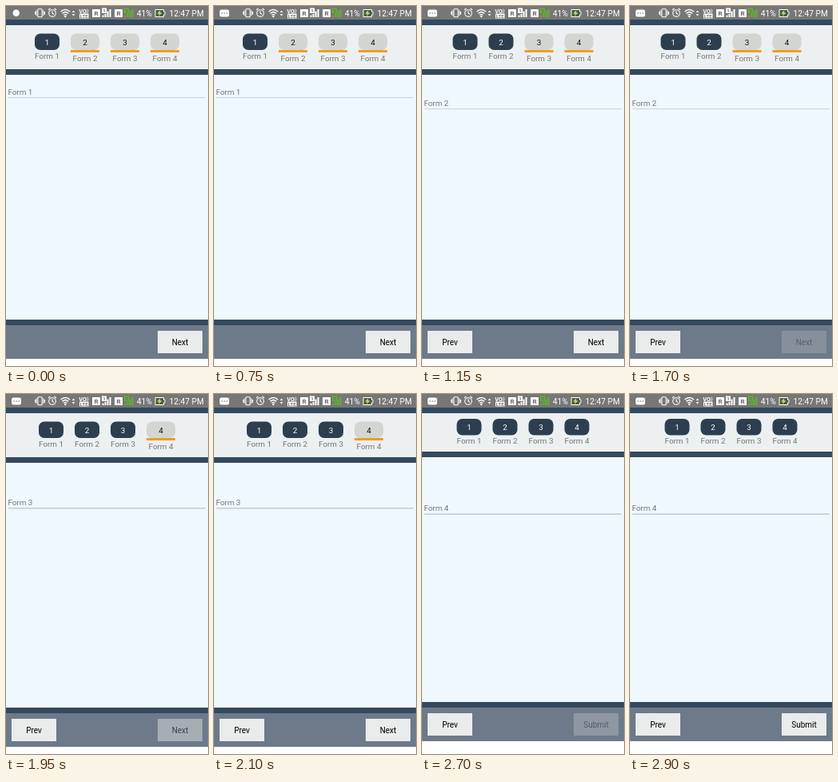
These frames come from a looping animation (253x450 px, 2.95 s). An HTML page:

```html
<!DOCTYPE html>
<html lang="en">
<head>
<meta charset="utf-8">
<title>Form steps</title>
<style>
  html, body { margin: 0; width: 100%; height: 100%; overflow: hidden; background: #fff; }
  svg { display: block; width: 100vw; height: 100vh; }
  text { font: 9.84px Roboto, sans-serif; }
  .mid { text-anchor: middle; }
  .label { fill: #727679; }
  .button text { font-size: 10px; }
  .clock { font-size: 10.2px; fill: #fff; }
  .tiny { font-size: 6px; font-weight: 700; }
</style>
</head>
<body>
<svg viewBox="0 0 253 450" preserveAspectRatio="none">
  <rect width="253" height="450" fill="#fff"/>
  <rect width="253" height="17.2" fill="#777"/>

  <g id="status" fill="#fff">
    <circle id="debug" cx="12.7" cy="8.7" r="4.2"/>
    <g id="chat">
      <rect x="7" y="4.5" width="12" height="9" rx="2.5"/>
      <g fill="#777">
        <circle cx="10" cy="9" r=".8"/><circle cx="13" cy="9" r=".8"/><circle cx="16" cy="9" r=".8"/>
      </g>
    </g>
    <g fill="none" stroke="#fff" stroke-width="1.1">
      <rect x="39.8" y="3.8" width="5.4" height="10" rx="1"/>
      <path d="M38 5.5v6.5M36.6 7v3.5M47 5.5v6.5M48.4 7v3.5"/>
      <circle cx="58" cy="9" r="4.3"/>
      <path d="M58 6.3V9l2 1.5M53 5l2.5-2.2M63 5l-2.5-2.2"/>
      <path d="M68.5 7q5.800-5 11.600 0M70.300 9.200q4-3.500 8 0M72.200 11.300q2.100-1.800 4.200 0" stroke-width="1.300"/>
    </g>
    <circle cx="74.300" cy="13" r="1.200"/>
    <path d="M82.700 8l1.800-2.600L86.300 8zM82.700 10l1.800 2.600 1.800-2.600z"/>
    <text class="tiny mid" x="96" y="8.500" style="font-size:7px">VO</text>
    <path d="M100.500 4.500q2 1.800 0 4M102 3.500q2.500 2.500 0 5.500" fill="none" stroke="#fff" stroke-width=".7"/>
    <rect x="92" y="9.500" width="11.500" height="6"/>
    <text class="tiny mid" x="97.700" y="14.600" fill="#777">LTE</text>
  </g>
  <g id="signals"></g>
  <text class="clock" x="163.700" y="12.600">41%</text>
  <path d="M187 4.500h10.500v2.500h1.500v4h-1.500v2.500H187z" fill="#4c6046" stroke="#fff"/>
  <path d="M193.500 4.800l-4 4.700h2.700l-1.500 3.700 4.500-5h-2.800z" fill="#d8f06a"/>
  <text class="clock" x="204.600" y="12.600">12:47 PM</text>

  <rect y="17" width="253" height="7" fill="#34495e"/>
  <rect y="24" width="253" height="55" fill="#ecf0f1"/>
  <g id="steps"></g>

  <g id="page">
    <rect y="79" width="253" height="362" fill="#34495e"/>
    <rect y="86" width="253" height="306" fill="#f0f8ff"/>
    <rect y="399" width="253" height="42" fill="#6d7a89"/>
    <g id="field">
      <text id="name" class="label" x="2.400" y="110.500"></text>
      <rect id="line" x="3" y="114" width="247" height="1"/>
    </g>
    <g id="prev" class="button">
      <rect x="7" y="406" width="56" height="28" fill="#eaebeb"/>
      <text class="mid" x="35" y="423.600">Prev</text>
    </g>
    <g id="next" class="button">
      <rect x="190" y="406" width="56" height="28" fill="#eaebeb"/>
      <text id="action" class="mid" x="218" y="423.600"></text>
    </g>
  </g>
</svg>
<script>
const LOOP = 2950, TICK = 50, FADE = 250, DIM = 0.2;
const taps = [{ down: 800, up: 900 }, { down: 1700, up: 1850 }, { down: 2550, up: 2650 }];
const lineColors = ['#c6d0d6', '#c8d1d8', '#adb6bc', '#a4b1bd'];
const $ = id => document.getElementById(id);

function add(parent, tag, attrs, text = '') {
  const node = document.createElementNS('http://www.w3.org/2000/svg', tag);
  for (const key in attrs) node.setAttribute(key, attrs[key]);
  node.textContent = text;
  parent.append(node);
  return node;
}

function addSignal(x, sim, color) {
  const g = $('signals');
  add(g, 'rect', { x: x - 12, y: 4, width: 10, height: 10, fill: '#fff' });
  add(g, 'text', { x: x - 7, y: 12, class: 'mid', fill: '#666', style: 'font-size:8px;font-weight:700' }, 'R');
  add(g, 'rect', { x, y: 2.5, width: 6, height: 6.5, fill: color });
  add(g, 'text', { x: x + 3, y: 8, class: 'tiny mid', fill: '#666' }, sim);
  for (let i = 0; i < 4; i++) {
    const h = i < 2 ? 2.5 + i * 1.5 : 2.5 + i * 2.5;
    add(g, 'rect', { x: x + 0.5 + i * 3, y: 14 - h, width: 2, height: h, fill: color });
  }
}
addSignal(120, '1', '#fff');
addSignal(148, '2', '#62b32a');

const steps = [1, 2, 3, 4].map(n => {
  const g = add($('steps'), 'g', {});
  return {
    g,
    pill: add(g, 'rect', { y: 34.5, height: 20.5, rx: 7 }),
    bar: add(g, 'rect', { y: 55, width: 36, height: 3, fill: '#f39c1f' }),
    digit: add(g, 'text', { y: 48.5, class: 'mid' }, n),
    label: add(g, 'text', { class: 'mid label' }, 'Form ' + n)
  };
});

function layoutSteps(form) {
  const widths = steps.map((_, i) => i < form ? 31 : 36);
  let x = (253 - widths.reduce((a, b) => a + b) - 14 * 3) / 2;
  steps.forEach((s, i) => {
    const active = i < form, w = widths[i];
    s.g.setAttribute('transform', `translate(${x} ${form === 4 ? -3.5 : 0})`);
    s.pill.setAttribute('width', w);
    s.pill.setAttribute('fill', active ? '#2c3e50' : '#d1d6d3');
    s.bar.setAttribute('visibility', active ? 'hidden' : 'visible');
    s.digit.setAttribute('x', w / 2);
    s.digit.setAttribute('fill', active ? '#fff' : '#111');
    s.label.setAttribute('x', w / 2);
    s.label.setAttribute('y', active ? 65.5 : 69);
    x += w + 14;
  });
}

const easeInOut = p => p < 0.5 ? 2 * p * p : 1 - 2 * (1 - p) ** 2;

function buttonOpacity(t) {
  const tap = taps.filter(k => t >= k.down).pop();
  if (!tap) return 1;
  const p = Math.min(1, Math.max(0, (t - tap.up) / FADE));
  return DIM + (1 - DIM) * easeInOut(p);
}

function show(id, on) {
  $(id).setAttribute('visibility', on ? 'visible' : 'hidden');
}

function render(t) {
  const form = 1 + taps.filter(k => t >= k.up).length;
  show('debug', t < 150);
  show('chat', t >= 150);
  show('prev', form > 1);
  layoutSteps(form);
  $('page').setAttribute('transform', `translate(0 ${form === 4 ? -7 : 0})`);
  $('field').setAttribute('transform', `translate(0 ${(form - 1) * 14.2})`);
  $('name').textContent = 'Form ' + form;
  $('line').setAttribute('fill', lineColors[form - 1]);
  $('action').textContent = form === 4 ? 'Submit' : 'Next';
  $('next').setAttribute('opacity', buttonOpacity(t));
}

const start = performance.now();
function loop() {
  const t = (performance.now() - start) % LOOP;
  render(Math.floor(t / TICK) * TICK);
  requestAnimationFrame(loop);
}
loop();
</script>
</body>
</html>
```
